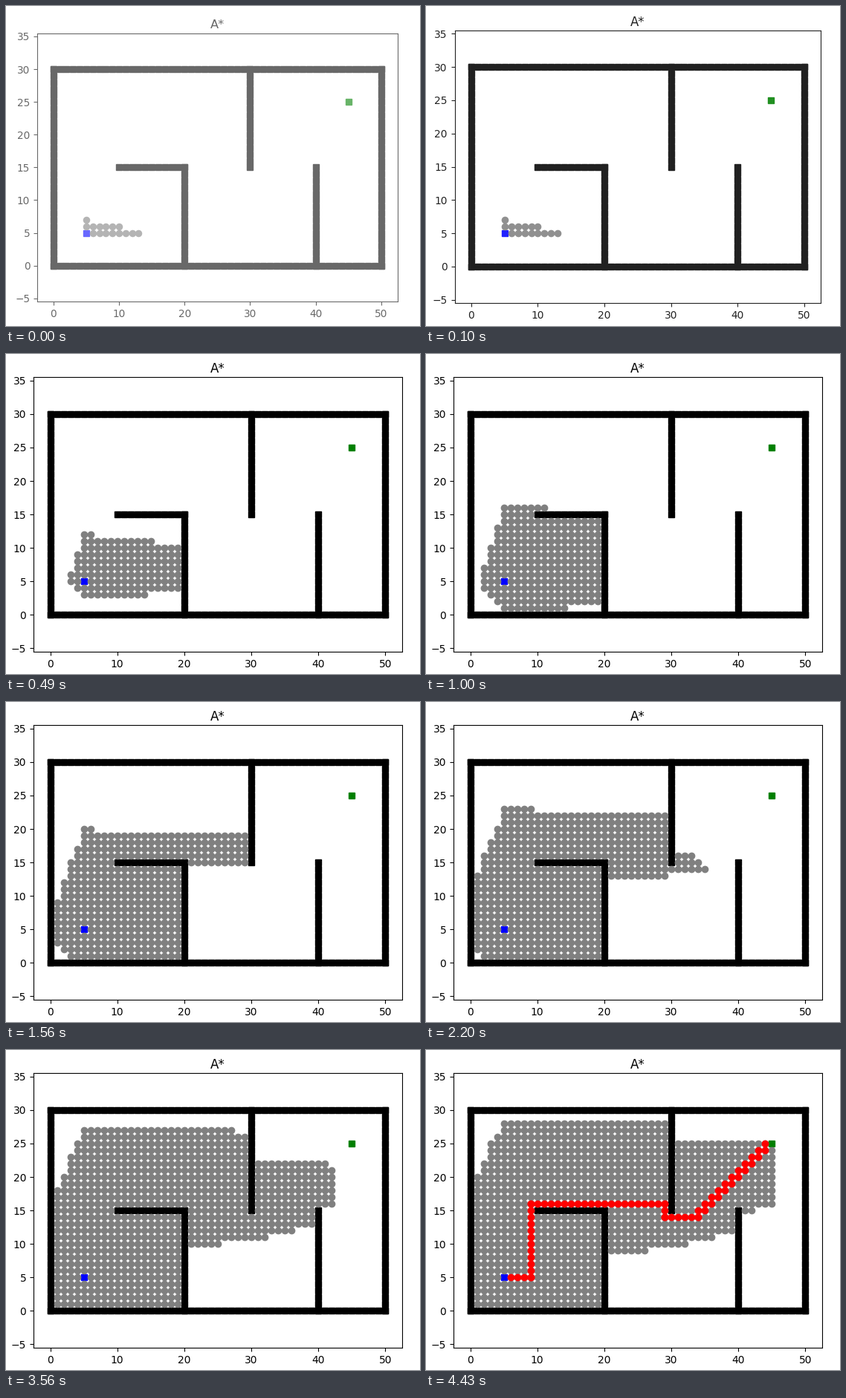
Animation, 557 px wide and 431 px high, one loop 5.19 s. Source, as a matplotlib script:

```python
import math

import matplotlib.pyplot as plt
from matplotlib.animation import FuncAnimation
from matplotlib.patches import Rectangle

W, H, DPI = 557, 431, 100
LOOP, STEP = 5190, 15
INTRO, PATH_TIME = 190, 4430
START, GOAL = (5, 5), (45, 25)

# Axes box in pixels, measured from the top left.
LEFT, RIGHT, TOP, BOTTOM = 37, 533, 31.3, 400.9


def line(a, b):
    """Grid cells from a to b along a row or a column."""
    n = max(abs(b[0] - a[0]), abs(b[1] - a[1]))
    return [(a[0] + (b[0] - a[0]) * i // n, a[1] + (b[1] - a[1]) * i // n)
            for i in range(n + 1)]


def polyline(*corners):
    return [c for a, b in zip(corners, corners[1:]) for c in line(a, b)]


def build_walls():
    return (polyline((0, 0), (50, 0), (50, 30), (0, 30), (0, 0))
            + polyline((10, 15), (20, 15), (20, 0))
            + line((30, 15), (30, 30))
            + line((40, 0), (40, 15)))


def build_path():
    path = polyline((6, 5), (9, 5), (9, 16), (29, 16), (29, 14), (34, 14))
    for i in range(11):
        path += [(34 + i, 14 + i), (34 + i, 15 + i)]
    return path


def search(walls):
    """A* on a four-connected grid; returns the cells in visiting order."""
    blocked = set(walls)
    cost = {START: 0}
    todo = {(math.dist(START, GOAL), START)}
    visited = []
    while todo:
        best = min(todo)
        todo.remove(best)
        cell = best[1]
        if cell == GOAL:
            break
        visited.append(cell)
        for dx, dy in ((-1, 0), (0, 1), (1, 0), (0, -1)):
            near = (cell[0] + dx, cell[1] + dy)
            new = cost[cell] + 1
            if near not in blocked and new < cost.get(near, math.inf):
                cost[near] = new
                todo.add((new + math.dist(near, GOAL), near))
    return visited[1:]


def build_schedule(total):
    """Cells appear in batches that grow with each third of the search;
    each batch takes longer the more cells are already drawn."""
    counts = [n for n in range(1, total) if n % (15 + 10 * (3 * n // total)) == 0]
    counts.append(total)
    schedule = [(0, counts[0]), (INTRO, counts[1])]
    for n in counts[2:]:
        schedule.append((schedule[-1][0] + 23 + 0.211 * n, n))
    return schedule


walls = build_walls()
visited = search(walls)
schedule = build_schedule(len(visited))

# The small surplus guards against rounding down to one pixel less.
fig = plt.figure(figsize=((W + 0.01) / DPI, (H + 0.01) / DPI), dpi=DPI,
                 facecolor="white")
ax = fig.add_axes([0, 0, 1, 1])
half = 27.5 * (BOTTOM - TOP) / (RIGHT - LEFT)
ax.set(xlim=(-2.5, 52.5), ylim=(15 - half, 15 + half),
       xticks=range(0, 51, 10), yticks=range(-5, 36, 5))


def markers(cells, style, color):
    return ax.plot(*zip(*cells), style, color=color, ls="none")[0]


parts = [
    markers([START], "s", "b"),
    markers([GOAL], "s", "g"),
    markers(walls, "s", "k"),
    markers(visited, "o", "gray"),
    markers(build_path(), "o", "r"),
]
dots, route = parts[3:]
veil = fig.add_artist(Rectangle((0, 0), 1, 1, transform=fig.transFigure,
                                color="white", lw=0, zorder=50))
shown = {"away": None}


def apply_view(away):
    """Place the plot; away runs from 1 (small and pale) to 0 (at rest)."""
    s = 1 - 0.022 * away
    dx, dy = 5.6 * away, 6 * away
    ax.set_position([(LEFT * s + dx) / W, 1 - (BOTTOM * s + dy) / H,
                     (RIGHT - LEFT) * s / W, (BOTTOM - TOP) * s / H])
    ax.set_title("A*", fontsize=12 * s, pad=4.6 * s)
    ax.tick_params(labelsize=10 * s, length=3.5 * s, width=0.8 * s, pad=3.5 * s)
    for spine in ax.spines.values():
        spine.set_linewidth(0.8 * s)
    for part in parts:
        part.set_markersize(6 * s)
        part.set_markeredgewidth(s)
        part.set_snap(False if away else None)
    veil.set_alpha(0.41 * away)


def draw(i):
    t = i * STEP + 10
    away = max(0, 1 - t // 50 * 50 / INTRO) ** 1.5
    if away != shown["away"]:
        apply_view(away)
        shown["away"] = away
    count = max(n for time, n in schedule if time <= t)
    dots.set_data(*zip(*visited[:count]))
    route.set_visible(t >= PATH_TIME)
    return parts


anim = FuncAnimation(fig, draw, frames=LOOP // STEP, interval=STEP,
                     repeat=True, repeat_delay=0, blit=False)
plt.show()
```
